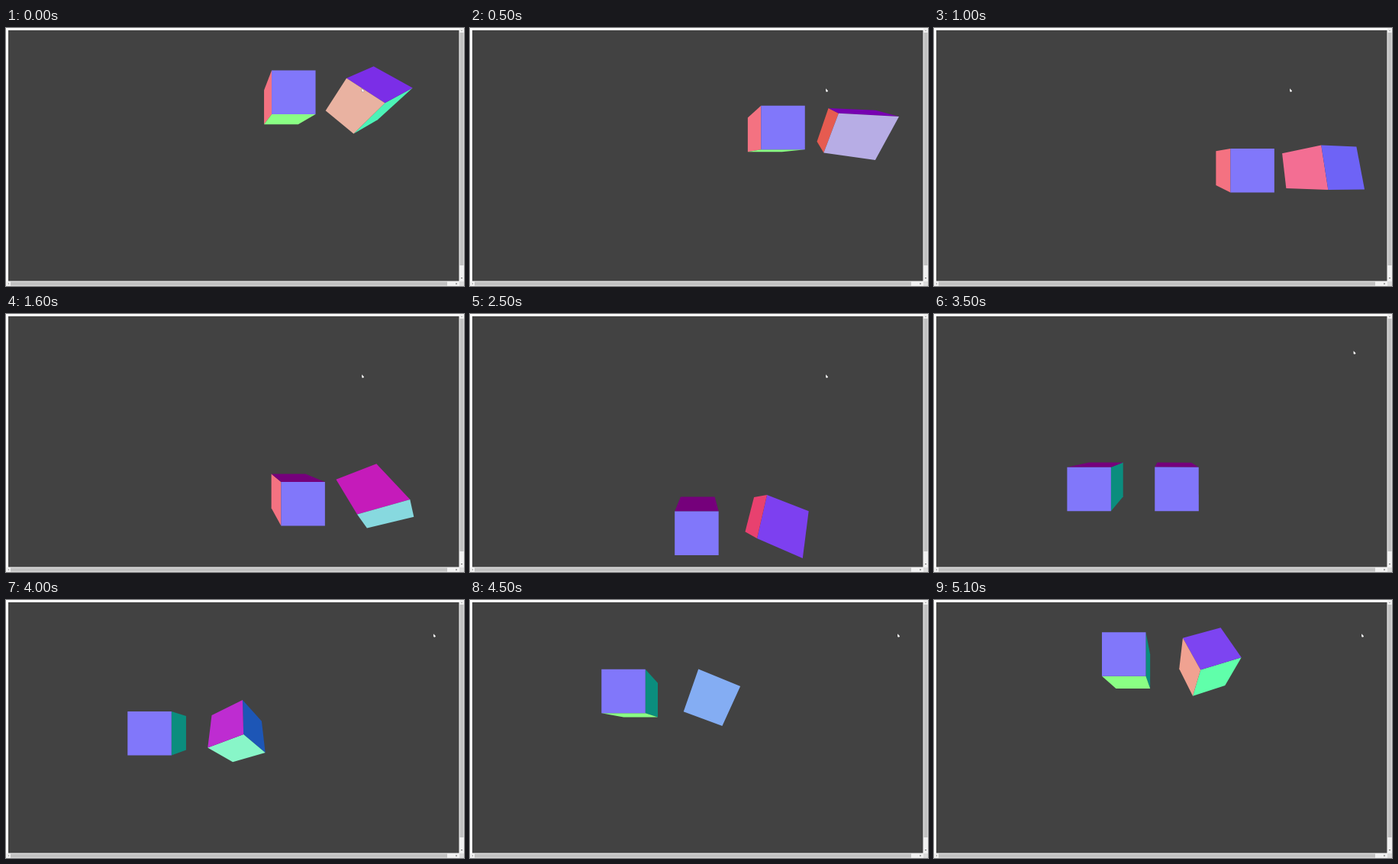
An HTML page with a canvas for the animation above (5.2 s loop, 600 by 338 pixels).

```html
<!DOCTYPE html>
<html lang="en">
<head>
<meta charset="utf-8">
<title>Orbiting cubes</title>
<style>
  html, body { margin: 0; width: 100%; height: 100%; overflow: hidden; background: #fff; }
  canvas { display: block; }
</style>
</head>
<body>
<canvas id="stage" width="600" height="338"></canvas>
<script>
const ctx = document.getElementById('stage').getContext('2d');

const LOOP = 5200, STEP = 100;
const CENTER = { x: 303, y: 172.5 };
const FOCAL = 201.25, CAMERA_Z = 4;
const ORBIT = 2, GAP = 2, SPIN = 1.2;
const START_ANGLE = -0.874, ANGULAR_SPEED = 0.999; // radians, radians per second
const POINTER_FROM = [466, 79], POINTER_TO = [560, 44];
const GLIDE_START = 3000, GLIDE_TIME = 1300;

const add = (a, b, k) => a.map((v, i) => v + b[i] * k);
const dot = (a, b) => a.reduce((sum, v, i) => sum + v * b[i], 0);
const clamp01 = v => Math.min(1, Math.max(0, v));

// Columns of Rx(ax) * Ry(ay)
function rotatedAxes(ax, ay) {
  const sx = Math.sin(ax), cx = Math.cos(ax);
  const sy = Math.sin(ay), cy = Math.cos(ay);
  return [
    [cy, sx * sy, -cx * sy],
    [0, cx, sx],
    [sy, -sx * cy, cx * cy]
  ];
}

function project([x, y, z]) {
  const scale = FOCAL / (CAMERA_Z - z);
  return [CENTER.x + x * scale, CENTER.y - y * scale];
}

// Normal as colour, with BT.709 video levels decoded as BT.601
function normalColor([x, y, z]) {
  const [r, g, b] = [-x, -y, z].map(v => 127.5 + 127.5 * v);
  const luma = 0.2126 * r + 0.7152 * g + 0.0722 * b;
  const cb = (b - luma) / 1.8556, cr = (r - luma) / 1.5748;
  const rgb = [luma + 1.402 * cr, luma - 0.344 * cb - 0.714 * cr, luma + 1.772 * cb];
  return `rgb(${rgb.map(v => Math.round(255 * clamp01(v / 255))).join(', ')})`;
}

function fillPolygon(points, color) {
  ctx.beginPath();
  points.forEach(([x, y]) => ctx.lineTo(x, y));
  ctx.closePath();
  ctx.fillStyle = color;
  ctx.fill();
}

function fillRect(color, x, y, w, h) {
  ctx.fillStyle = color;
  ctx.fillRect(x, y, w, h);
}

function drawCube(position, axes) {
  for (let i = 0; i < 3; i++) {
    const u = axes[(i + 1) % 3], v = axes[(i + 2) % 3];
    for (const side of [-1, 1]) {
      const normal = axes[i].map(c => c * side);
      const middle = add(position, normal, 0.5);
      const toCamera = add([0, 0, CAMERA_Z], middle, -1);
      if (dot(normal, toCamera) <= 0) continue;
      const corners = [0, 1, 2, 3].map(n => {
        const turn = Math.PI / 4 + n * Math.PI / 2;
        const along = add(middle, u, Math.cos(turn) * Math.SQRT1_2);
        return project(add(along, v, Math.sin(turn) * Math.SQRT1_2));
      });
      fillPolygon(corners, normalColor(normal));
    }
  }
}

// Small triangle pointing along (dx, dy)
function drawArrow(x, y, dx, dy, color) {
  fillPolygon([
    [x + dx, y + dy],
    [x - dx + 1.5 * dy, y - dy + 1.5 * dx],
    [x - dx - 1.5 * dy, y - dy - 1.5 * dx]
  ], color);
}

function drawWindow() {
  fillRect('#fff', 0, 0, 600, 338);
  fillRect('#424242', 3, 3, 590.5, 328.5);
  fillRect('#f1f1f1', 594, 0, 6, 332);
  fillRect('#f1f1f1', 0, 332, 594, 6);
  fillRect('#dcdcdc', 594, 332, 6, 6);
  fillRect('#c1c1c1', 594.5, 6, 5, 305);
  fillRect('#c1c1c1', 6, 332.5, 572, 5);
  drawArrow(597, 3.2, 0, -0.8, '#a3a3a3');
  drawArrow(597, 327.8, 0, 0.8, '#505050');
  drawArrow(3.2, 335, -0.8, 0, '#a3a3a3');
  drawArrow(590.3, 335, 0.8, 0, '#505050');
}

function drawPointer(t) {
  const progress = clamp01((t - GLIDE_START) / GLIDE_TIME);
  const eased = 1 - (1 - progress) ** 4.5;
  const [x, y] = add(POINTER_FROM, add(POINTER_TO, POINTER_FROM, -1), eased);
  fillPolygon([[x, y], [x, y + 4.3], [x + 2, y + 5], [x + 3.2, y + 3.2]], '#fff');
  ctx.strokeStyle = 'rgba(0, 0, 0, 0.5)';
  ctx.lineWidth = 0.4;
  ctx.stroke();
}

function draw(t) {
  const angle = START_ANGLE + ANGULAR_SPEED * t / 1000;
  const x = ORBIT * Math.cos(angle), y = -ORBIT * Math.sin(angle);
  drawWindow();
  drawCube([x, y, 0], rotatedAxes(0, 0));
  drawCube([x + GAP, y, 0], rotatedAxes(-SPIN * angle, SPIN * angle));
  drawPointer(t);
}

const start = performance.now();
function tick() {
  const elapsed = (performance.now() - start) % LOOP;
  draw(Math.floor(elapsed / STEP) * STEP);
  requestAnimationFrame(tick);
}
tick();
</script>
</body>
</html>
```
